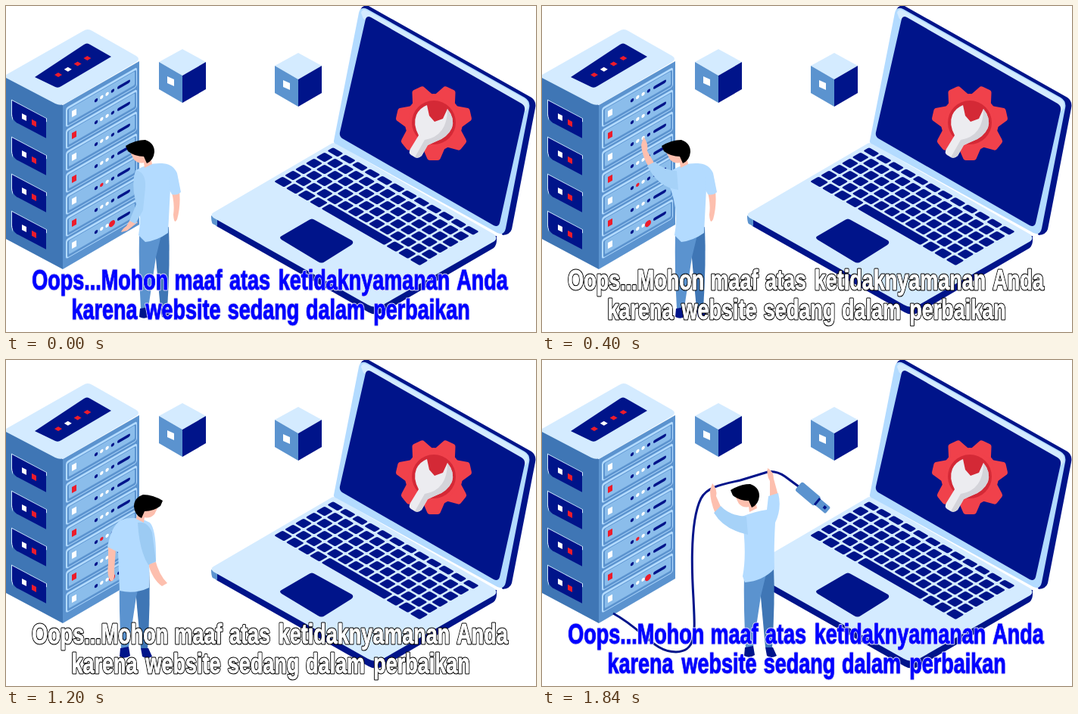
Write an HTML page that moves like this. It is 700 px wide and 431 px high and loops after 2000 ms.

```html
<!DOCTYPE html>
<html lang="id">
<head>
<meta charset="utf-8">
<title>Dalam perbaikan</title>
<style>
  html, body { margin: 0; width: 100%; height: 100%; overflow: hidden; background: #fff; }
  svg { display: block; width: 100%; height: 100%; }
  .navy { fill: #00148a; }
  .pale { fill: #d4ebff; }
  .light { fill: #b3dbff; }
  .mid { fill: #5b93cf; }
  .deep { fill: #3f76b5; }
  .white { fill: #fff; }
  .red { fill: #ed1c2b; }
  .skin { fill: #fdbfae; }
  .pose { visibility: hidden; }
  .pose.on { visibility: visible; }
  #caption { font: bold 37px "Liberation Sans", Arial, sans-serif; text-anchor: middle; stroke-linejoin: round; }
  #caption text { fill: var(--ink); stroke: var(--ink); stroke-width: .9; }
  #caption .edge { stroke: var(--edge); stroke-width: 3.2; }
</style>
</head>
<body>
<svg viewBox="0 0 700 431">
  <defs>
    <g id="cube">
      <path class="pale" d="M0-35 31-18 0 0-31-18Z"/>
      <path class="mid" d="M-31-18 0 0V36L-31 18Z"/>
      <path class="navy" d="M31-18 0 0V36L31 18Z"/>
      <path class="white" d="M-20 1-11 5V14L-20 10Z"/>
    </g>
    <g id="head">
      <path class="skin" d="M164 193 169 203Q175 209 182 207L183 214 193 209 190 194Z"/>
      <path d="M158 185Q171 177 184 177 196 181 196 193 195 204 186 208L182 199Q170 199 161 192Z"/>
    </g>
    <g id="legs">
      <path class="deep" d="M195 300 215 292Q217 340 213 400H204L199 345Z"/>
      <path class="mid" d="M176 300 207 295 198 332 188 399 178 400Q175 350 176 300Z"/>
      <path class="navy" d="M177 400 188 398 190 410Q183 415 176 411ZM204 400H214L219 411Q212 415 206 411Z"/>
    </g>
    <g id="torso">
      <path class="light" d="M172 217Q188 207 206 208 216 214 217 242L214 300Q200 310 184 312L175 303Q181 270 169 240Z"/>
    </g>
    <g id="hangingArm">
      <path class="skin" d="M219 247 229 245Q231 264 226 282 222 290 221 276 223 262 219 247Z"/>
      <path class="light" d="M202 208Q220 207 226 221L231 246Q226 251 219 249L210 232Z"/>
    </g>
    <g id="reachingArm">
      <path class="skin" d="M134 173Q141 181 139 192L149 209 141 213Q132 198 131 184Z"/>
      <path fill="#a6d2f8" d="M139 211 149 206Q161 217 178 218L180 243Q153 240 139 211Z"/>
    </g>
  </defs>

  <g id="server">
    <path class="deep" d="M0 92 75 131V348L0 308Z"/>
    <path class="mid" d="M75 131 176 73V289L75 348Z"/>
    <path class="pale" d="M0 91 102 33Q108 29 114 33L172 66Q178 70 172 74L80 128Q73 133 65 129L0 95Z"/>
    <path class="navy" d="M38 94 103 51Q107 48 111 51L139 67 73 106Q69 109 65 107Z"/>
    <g id="lamps"></g>
    <g id="windows" transform="matrix(1 .53 0 1 8 125)"></g>
    <g id="units" transform="matrix(1 -.575 0 1 75 133)"></g>
  </g>

  <use href="#cube" x="233" y="92"/>
  <use href="#cube" x="386" y="97"/>

  <g id="laptop">
    <path class="navy" d="M271 278 278 291 479 405Q488 410 498 405L644 320Q649 316 648 304Z"/>
    <path class="mid" d="M271 277 279 281V291L273 288Q271 286 271 277Z"/>
    <path class="pale" d="M274 273 428 183Q433 179 438 183L645 302Q650 307 645 311L498 395Q488 401 478 395L274 280Q269 276 274 273Z"/>
    <path class="navy" d="M364 304 400 283Q404 280 408 283L457 310Q460 313 456 316L421 338Q417 341 412 338L364 309Q360 306 364 304Z"/>
    <g id="keys" class="navy" transform="matrix(.866 .5 -.866 .5 432 187)"></g>
    <path class="navy" d="M468 5Q471-2 479 0L694 121Q701 126 699 135L668 295Q666 302 656 303Z"/>
    <path class="light" d="M433 178 466 9Q468 0 477 4L685 121Q693 126 691 135L660 294Q658 304 649 300L437 183Q432 181 433 178Z"/>
    <path class="pale" d="M469 9Q471 2 479 7L684 122Q691 126 689 135L686 139 472 17Z"/>
    <path class="navy" d="M475 17Q477 12 482 15L681 129Q686 132 685 138L652 287Q650 293 644 290L444 175Q440 172 441 167Z"/>
  </g>

  <g id="repair">
    <g fill="#f0414b" id="gear" transform="translate(565 154)"></g>
    <circle cx="565" cy="154" r="29" fill="#d42936"/>
    <path fill="#ececf0" d="M556 131 559 145 566 153 577 149 583 136Q593 148 589 161 583 174 568 179L557 184 549 198Q545 202 540 200L535 197Q531 194 534 189L545 171Q537 156 542 144 546 135 556 131Z"/>
    <path fill="#d4d4da" d="M583 136Q593 148 589 161 583 174 568 179L557 184 549 198Q545 202 540 200L553 177Q583 172 583 136Z"/>
  </g>

  <g class="pose">
    <use href="#legs"/>
    <use href="#hangingArm"/>
    <use href="#torso"/>
    <path class="skin" d="M165 281 174 286Q166 292 160 297L152 299Q154 294 159 291Z"/>
    <path fill="#a6d2f8" d="M171 217Q185 219 184 240L181 270 171 288 163 284 172 262Q165 236 171 217Z"/>
    <use href="#head"/>
  </g>

  <g class="pose">
    <use href="#legs"/>
    <use href="#hangingArm"/>
    <use href="#torso"/>
    <use href="#reachingArm"/>
    <use href="#head"/>
  </g>

  <g class="pose">
    <use href="#legs"/>
    <path class="skin" d="M156 168Q166 167 180 176L178 183Q166 178 156 172Z"/>
    <path class="light" d="M178 176Q195 181 209 185 216 194 215 216L217 245 190 235Z"/>
    <use href="#torso"/>
    <use href="#reachingArm"/>
    <use href="#head"/>
  </g>

  <g class="pose">
    <use href="#legs" x="-26" y="-19"/>
    <path class="skin" d="M135 246 145 249 143 279Q144 294 138 292 133 285 135 270Z"/>
    <path class="skin" d="M187 267 197 264Q202 284 213 295L206 299Q193 290 187 267Z"/>
    <path class="light" d="M151 212Q139 220 134 247L148 254 150 305Q170 310 189 301V270L198 267Q199 225 190 215 170 204 151 212Z"/>
    <path fill="#9ccbf3" d="M174 215Q187 213 193 228L198 266 188 271Q176 252 174 215Z"/>
    <use href="#head" transform="translate(365 1) scale(-1 1)"/>
  </g>

  <g class="pose">
    <path fill="none" stroke="#00148a" stroke-width="3" d="M94 335C135 357 147 386 177 386 205 385 202 360 200 315 196 250 199 205 210 183 218 167 240 164 262 159L298 148Q309 146 321 154L344 171"/>
    <g transform="translate(339 166) rotate(40)">
      <rect class="mid" y="-7" width="33" height="15" rx="3"/>
      <rect class="mid" x="31" y="-5" width="20" height="11" rx="2"/>
      <path class="navy" d="M31-5H34V6H31ZM43-2H47V2H43Z"/>
    </g>
    <use href="#legs" x="91" y="-20"/>
    <path class="skin" d="M225 163Q232 171 230 180L237 196 229 203Q222 187 222 172Z"/>
    <path class="skin" d="M298 143Q306 147 306 157L312 179 301 183 301 160Q296 151 298 143Z"/>
    <path class="light" d="M299 180 312 176Q317 196 308 215 306 250 307 276 292 292 268 294L265 286Q271 255 264 207 282 200 297 198Z"/>
    <path fill="#a6d2f8" d="M236 193Q248 206 270 207L272 231Q240 224 227 202Z"/>
    <use href="#head" x="91" y="-13"/>
  </g>

  <g id="caption"></g>
</svg>

<script>
  const fill = (id, markup) => document.getElementById(id).innerHTML = markup;
  const range = n => [...Array(n).keys()];
  const rect = (x, y, w, h, cls = "", rx = 0) =>
    `<rect x="${x}" y="${y}" width="${w}" height="${h}" rx="${rx}" class="${cls}"/>`;

  fill("lamps", range(4).map(i =>
    `<path class="${i === 1 ? "white" : "red"}" transform="translate(${69 + i * 12.8} ${91 - i * 7.3})" d="M-5 0 0-3 5 0 0 3Z"/>`).join(""));

  fill("windows", range(4).map(i => {
    const y = i * 49;
    return `<path class="pale" d="M-1 ${y - 1}H46V${y + 4}H1V${y + 26}L-1 ${y + 20}Z"/>
      <path class="navy" d="M0 ${y}H45V${y + 26}H6Q0 ${y + 25} 0 ${y + 18}Z"/>` +
      rect(13, y + 10, 6, 7, "white") + rect(26, y + 11, 6, 7, "red");
  }).join(""));

  fill("units", range(7).map(i => {
    const y = 4 + i * 29;
    const dots = range(4).map(k => {
      const alert = i === 4 && k === 1;
      return `<circle cx="${44 + k * 7.3}" cy="${y + 13}" r="2.2" class="${alert ? "red" : k % 3 ? "white" : "navy"}"/>`;
    }).join("");
    return rect(4, y, 94, 26, "light", 3) + rect(6, y + 3, 91, 22, "mid", 2) +
      rect(8, y + 4, 87, 18, "", 2).replace("/>", ' fill="#8bbdeb"/>') +
      rect(12, y + 9, 6, 8, i % 2 ? "red" : "white") + dots +
      rect(72, y + 11, 17, 4, "navy", 2) +
      (i === 6 ? `<circle cx="65" cy="${y + 14}" r="4" class="red"/>` : "");
  }).join(""));

  const keyRow = (y, count, start = 0, pitch = 16, h = 13) =>
    range(count).map(i => rect(start + i * pitch, y, pitch - 3, h, "", 2)).join("");
  fill("keys",
    keyRow(0, 12, 0, 18.8, 9) +
    range(4).map(r => keyRow(13 + r * 16, 14)).join("") +
    keyRow(77, 4, 0, 18) + rect(72, 77, 96, 13, "", 2) + keyRow(77, 3, 171, 18));

  fill("gear", '<circle r="38"/>' + range(7).map(i =>
    `<path transform="rotate(${(i + .5) * 360 / 7})" d="M-15-33-9-47Q-8-50-5-50H5Q8-50 9-47L15-33Z"/>`).join(""));

  // Condensed caption: word centres on two baselines.
  const lines = [
    [375, [80, "Oops..."], [170, "Mohon"], [254, "maaf"], [322, "atas"], [473, "ketidaknyamanan"], [629, "Anda"]],
    [414, [130, "karena"], [234, "website"], [340, "sedang"], [435, "dalam"], [549, "perbaikan"]]
  ];
  const caption = document.getElementById("caption");
  const words = cls => lines.map(([y, ...list]) => list.map(([x, word]) =>
    `<text class="${cls}" transform="translate(${x} ${y}) scale(.73 1)">${word}</text>`).join("")).join("");
  caption.innerHTML = words("edge") + words("");

  const poses = document.querySelectorAll(".pose");
  const start = performance.now();
  function draw(now) {
    const step = Math.floor(Math.max(0, now - start) % 2000 / 400);
    poses.forEach((pose, i) => pose.classList.toggle("on", i === step));
    caption.style.setProperty("--ink", step % 2 ? "#fff" : "#00f");
    caption.style.setProperty("--edge", step % 2 ? "#000" : "#dcdcf2");
    requestAnimationFrame(draw);
  }
  draw(start);
</script>
</body>
</html>
```
